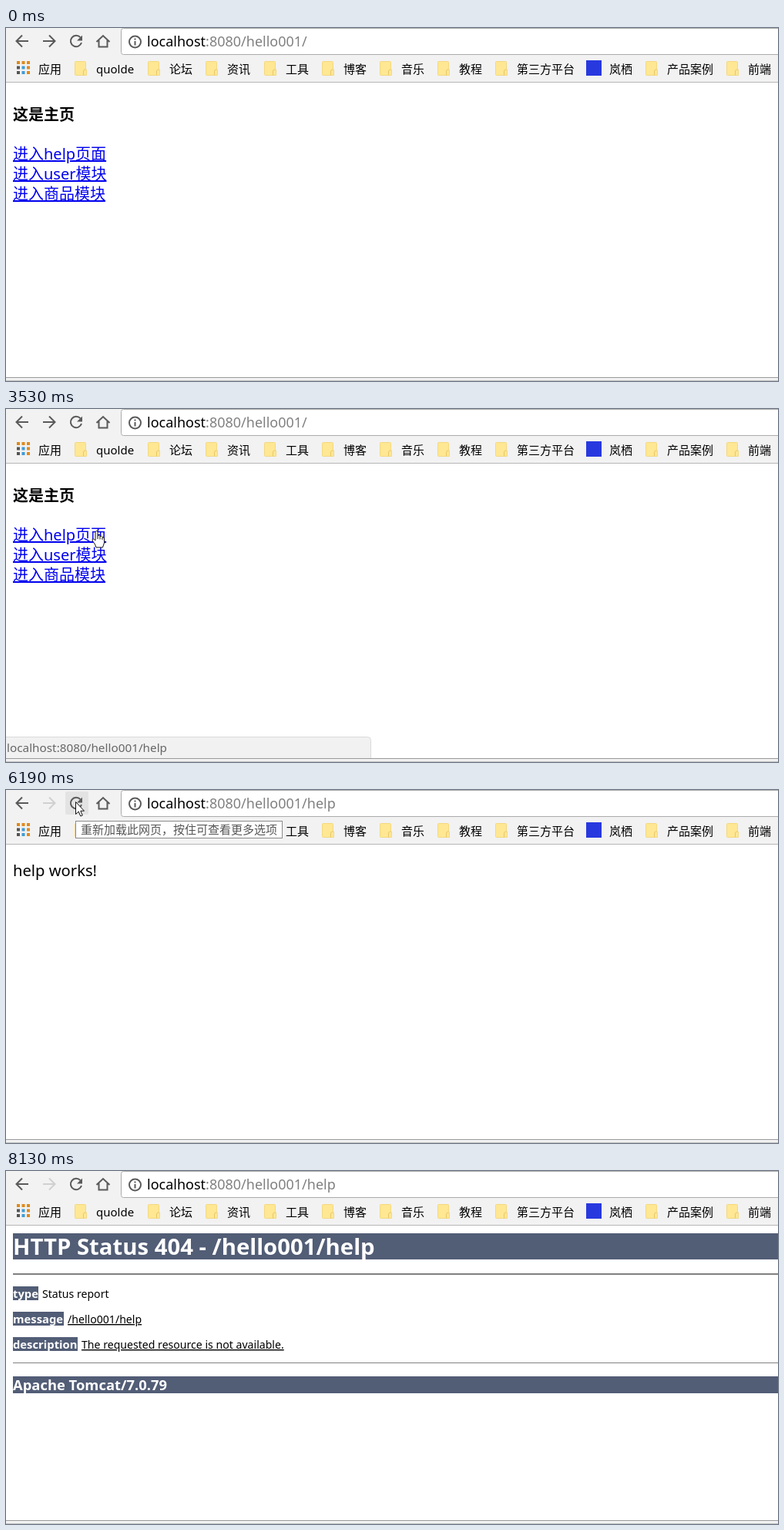
Recreate the animation shown at these times as an HTML page. Size 1002 by 459 pixels, loop 9.14 s.

```html
<!DOCTYPE html>
<html lang="zh-CN">
<head>
<meta charset="utf-8">
<title>Browser session</title>
<style>
  html, body { margin: 0; width: 100%; height: 100%; overflow: hidden; background: #fff; }
  svg { display: block; font-family: "Noto Sans", "Noto Sans CJK SC", sans-serif; }
  text { white-space: pre; }
  .icon { fill: none; stroke: #5a5a5a; stroke-width: 2; }
  .link { font-size: 20px; fill: #00e; }
  .link, .underline { text-decoration: underline; text-decoration-skip-ink: none; }
  .link { text-decoration-thickness: 2px; }
  .bar { fill: #525d76; }
  .strong { font-weight: bold; fill: #fff; }
  .small { font-size: 14.1px; }
  .small.strong { font-size: 14.8px; }
  .pointer { fill: #fff; stroke: #111; stroke-linejoin: round; }
</style>
</head>
<body>
<svg width="1002" height="459" viewBox="0 0 1002 459">
  <rect width="1002" height="459" fill="#fff"/>

  <g id="home">
    <text x="9" y="120" font-size="20" font-weight="bold">这是主页</text>
    <text class="link" id="helpLink" x="9" y="171">进入help页面</text>
    <text class="link" x="9" y="197">进入user模块</text>
    <text class="link" x="9" y="223">进入商品模块</text>
  </g>

  <text id="help" x="9" y="112" font-size="20.2">help works!</text>

  <g id="missing">
    <path class="bar" d="M9 81H1002V115H9zM9 150H42V168H9zM9 183H75V201H9zM9 216H93V234H9zM9 267H1002V289H9z"/>
    <path fill="#808080" d="M9 133H1002V135H9zM9 249H1002V250H9z"/>
    <text class="strong" x="9" y="109" font-size="29.3">HTTP Status 404 - /hello001/help</text>
    <text class="small strong" x="9" y="165">type</text>
    <text class="small" x="47" y="165">Status report</text>
    <text class="small strong" x="9" y="198">message</text>
    <text class="small underline" x="80" y="198">/hello001/help</text>
    <text class="small strong" x="9" y="231">description</text>
    <text class="small underline" x="98" y="231">The requested resource is not available.</text>
    <text class="strong" x="9" y="285" font-size="18.4">Apache Tomcat/7.0.79</text>
  </g>

  <g id="status">
    <path d="M-1 455V426.5H469.5a4 4 0 0 1 4 4V455" fill="#f1f1f1" stroke="#dadada"/>
    <text id="statusText" x="1" y="446" font-size="15.3" fill="#666"></text>
  </g>

  <rect y="454" width="1002" height="5" fill="#f2f2f2"/>
  <path d="M0 454.5H1002" stroke="#999"/>
  <path d="M0 458.5H1002" stroke="#c4c4c4"/>

  <rect width="1002" height="70" fill="#f2f2f2"/>
  <path d="M0 70.5H1002" stroke="#b6b6b6"/>
  <rect x="149.5" y=".5" width="860" height="34" rx="3" fill="#fff" stroke="#ababab"/>
  <rect id="hover" x="77" y="2" width="30" height="30" rx="2" fill="#e3e3e3"/>
  <path class="icon" d="M29 17H14M21 9.5L13.5 17L21 24.5"/>
  <path class="icon" id="forward" d="M48 17H63M56 9.5L63.5 17L56 24.5"/>
  <g id="reload">
    <path class="icon" d="M96.5 12.2A7.2 7.2 0 1 0 98 19"/>
    <path d="M99 9.5V16.5H92z" fill="#5a5a5a"/>
  </g>
  <path class="icon" id="stop" d="M84 10L98 24M98 10L84 24"/>
  <path class="icon" d="M117.5 18L126 10L134.5 18M120.5 16V24.5H131.5V16"/>
  <circle cx="167.5" cy="18" r="7.5" class="icon"/>
  <path d="M166.5 13.5h2v2h-2zM166.5 17h2v5.5h-2z" fill="#5a5a5a"/>

  <rect id="selection" x="183" y="5" width="209" height="24" fill="#39f"/>
  <text x="183" y="24" font-size="18"><tspan id="host">localhost</tspan><tspan id="path"></tspan></text>
  <path id="caret" d="M393.5 7V28" stroke="#000"/>

  <g id="bookmarks" font-size="15"></g>

  <g id="tooltip">
    <rect x="90.5" y="40.5" width="268" height="22" fill="#fff" stroke="#8a8a8a"/>
    <text x="97" y="57" font-size="15" fill="#555">重新加载此网页，按住可查看更多选项</text>
  </g>

  <g id="cursor">
    <path id="arrow" class="pointer" d="M.5.5V16.5L4.2 13L6.8 19L9.3 18L6.8 12.2H11.5z"/>
    <path id="beam" fill="none" stroke="#111" d="M-3-8.5H0M1-8.5H4M.5-8V7M-3 7.5H0M1 7.5H4"/>
    <g id="hand">
      <path class="pointer" d="M-1 1.5Q.5-.5 2 1.5V7Q4 5.5 5 7.5Q7 6.5 8 8.5Q10.5 8 10.5 11V16L8.5 22H0L-1.5 18L-5 13Q-5 10-2.5 11.5L-1 13z"/>
      <path d="M2 7V11M5 8V11.5M8 9V12" stroke="#111"/>
    </g>
  </g>
</svg>
<script>
const LOOP = 9140;
const ids = {};
document.querySelectorAll("[id]").forEach(el => ids[el.id] = el);
const show = (id, on) => ids[id].style.display = on ? "" : "none";

function buildBookmarks() {
  const folder = x => `<path d="M${x + .5} 44.5q0-1 1-1h12q1 0 1 1V54h1v7.5h-14q-1 0-1-1z"
    fill="#ffe794" stroke="#f3d980"/><path d="M${x + 11.5} 61.5V56q0-2 3-2" fill="none" stroke="#e9c766"/>`;
  const label = (x, name) => `<text x="${x}" y="59">${name}</text>`;
  const folders = [[117, "quolde"], [212, "论坛"], [287, "资讯"], [363, "工具"], [438, "博客"], [513, "音乐"],
    [588, "教程"], [663, "第三方平台"], [858, "产品案例"], [963, "前端"]];
  const orange = "#df8a1c", gray = "#555", blue = "#3f9bd8";
  const dots = [orange, orange, orange, gray, blue, orange, gray, blue, orange];
  ids.bookmarks.innerHTML =
    dots.map((color, i) => `<rect x="${14 + i % 3 * 6.5}" y="${43 + Math.floor(i / 3) * 6.5}" width="4" height="4" fill="${color}"/>`).join("") +
    label(42, "应用") + folders.map(([x, name]) => folder(x - 28) + label(x, name)).join("") +
    `<rect x="753" y="42" width="20" height="20" fill="#2838df"/>` + label(783, "岚栖");
}

// Pointer strokes: start, end, number of steps, destination
const strokes = [
  [130, 970, 11, 414, 8],
  [1060, 1140, 2, 427, 21],
  [2900, 3530, 9, 117, 158],
  [3810, 3840, 2, 111, 159],
  [5250, 5650, 6, 100, 19],
  [5725, 5850, 3, 90, 15],
  [6870, 7750, 12, 877, 333],
  [7810, 8050, 4, 933, 432]
];

function pointerAt(t) {
  let x = 880, y = 452;
  for (const [start, end, steps, toX, toY] of strokes) {
    if (t < start) break;
    const step = Math.floor(Math.min(1, (t - start) / (end - start)) * (steps - 1));
    const p = (step + 1) / steps, eased = p * p * (3 - 2 * p);
    x += (toX - x) * eased;
    y += (toY - y) * eased;
  }
  return [Math.round(x), Math.round(y)];
}

function render(t) {
  const within = (a, b) => t >= a && t < b;
  const onHelp = t >= 4320;
  const [x, y] = pointerAt(t);

  show("home", !onHelp);
  show("help", within(4320, 6430));
  show("missing", t >= 6430);
  ids.helpLink.style.fill = within(4150, 4320) ? "#e00" : "";

  const loading = within(2150, 2760) || within(6270, 6430);
  show("stop", loading);
  show("reload", !loading);
  ids.reload.style.opacity = within(6430, 6640) ? .8 : 1;
  ids.forward.style.stroke = onHelp ? "#d0d0d0" : "";
  show("hover", t < 6270 && x >= 77 && x < 107 && y < 32);
  show("tooltip", within(6020, 6270));

  const selected = within(1450, 2150);
  show("selection", selected);
  show("caret", within(1380, 1450));
  ids.host.setAttribute("fill", selected ? "#fff" : "#000");
  ids.path.setAttribute("fill", selected ? "#fff" : "#808080");
  ids.path.textContent = ":8080/hello001/" + (onHelp ? "help" : "");

  const overLink = !onHelp && x < 131 && y > 150 && y < 178;
  const connecting = within(2620, 2760);
  show("status", connecting || overLink || within(4320, 5690));
  ids.statusText.textContent = connecting ? "正在连接..." : "localhost:8080/hello001/help";
  ids.status.style.opacity = Math.max(0, Math.min(1, (5680 - t) / 240));

  const overAddress = x > 150 && y < 35;
  show("cursor", within(130, 8130));
  show("beam", overAddress);
  show("hand", overLink);
  show("arrow", !overAddress && !overLink);
  ids.cursor.setAttribute("transform", `translate(${x} ${y})`);
}

buildBookmarks();
const began = performance.now();
function frame() {
  render((performance.now() - began) % LOOP);
  requestAnimationFrame(frame);
}
frame();
</script>
</body>
</html>
```
